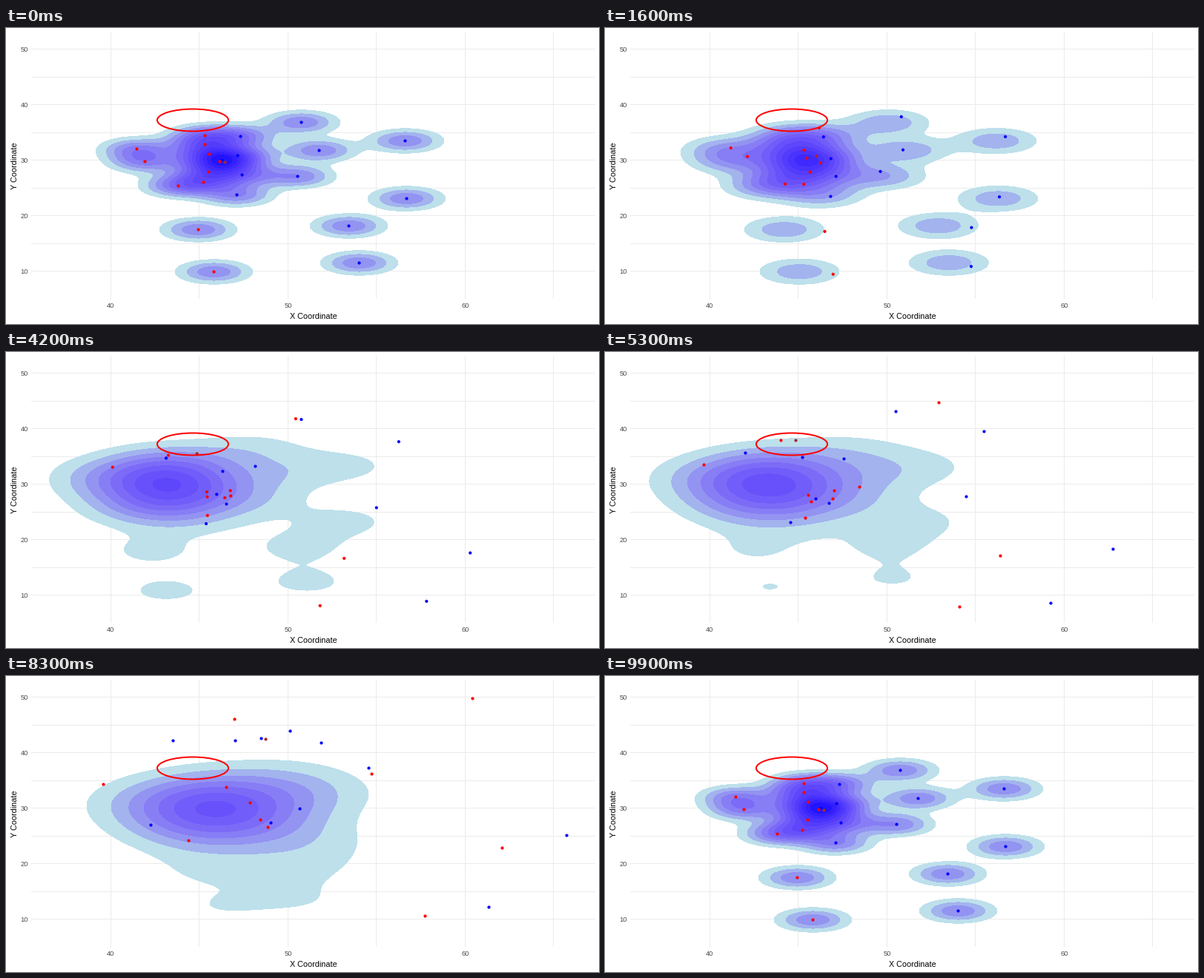
Animation of 800x400 px, one loop 10000 ms. Source, as a matplotlib script:

```python
import matplotlib.pyplot as plt
import numpy as np
from matplotlib.animation import FuncAnimation
from matplotlib.patches import Ellipse

W, H, DPI = 800, 400, 100
FRAMES, INTERVAL = 100, 100
PX = 72 / DPI  # one pixel in points

# Each player: pixel position at the start, at MID and at LATE seconds
MID, LATE = 5.3, 8.3
RED = [
    [(176, 163), (133, 152), (131, 146)],
    [(187, 180), (237, 119), (308, 58)],
    [(268, 145), (450, 68), (629, 30)],
    [(268, 157), (274, 193), (297, 150)],
    [(274, 170), (278, 202), (343, 194)],
    [(288, 180), (309, 187), (329, 171)],
    [(273, 194), (307, 198), (353, 204)],
    [(266, 208), (270, 224), (246, 222)],
    [(232, 213), (343, 182), (493, 132)],
    [(259, 272), (533, 275), (669, 232)],
    [(280, 329), (478, 344), (565, 324)],
]
BLUE = [
    [(316, 146), (189, 136), (225, 87)],
    [(312, 172), (284, 198), (357, 198)],
    [(318, 198), (302, 204), (396, 179)],
    [(311, 225), (250, 230), (195, 201)],
    [(398, 127), (392, 80), (344, 84)],
    [(422, 165), (322, 144), (425, 90)],
    [(393, 200), (266, 142), (309, 87)],
    [(538, 152), (511, 107), (383, 74)],
    [(540, 230), (487, 195), (489, 124)],
    [(462, 267), (685, 266), (756, 215)],
    [(476, 317), (601, 339), (651, 312)],
]
BALL = [[(295, 181), (257, 119), (350, 85)]]
COLORS = ["red"] * len(RED) + ["blue"] * len(BLUE) + ["brown"]

# Frames that repeat the picture before them
HELD = ({*range(1, 50, 4)} | {*range(56, 93, 4)} | {24, 28, 87, 94, 95, 97, 98})

LEVELS = np.arange(1, 15)
GX = np.arange(40, 681, 2.0)
GY = np.arange(90, 371, 1.5)

# Start at rest: p = start + a t^2 + b t^3, with a and b from the two later points
START, at_mid, at_late = np.array(RED + BLUE + BALL, float).transpose(1, 0, 2)
det = MID**2 * LATE**2 * (LATE - MID)
ACCEL = ((at_mid - START) * LATE**3 - (at_late - START) * MID**3) / det
JERK = ((at_late - START) * MID**2 - (at_mid - START) * LATE**2) / det


def positions(t):
    return START + ACCEL * t**2 + JERK * t**3


def density(t):
    """Kernel density whose bumps drift left and back, gather and widen."""
    grow = 1 - np.exp(-(t / 4) ** 2)
    r = START[:, 0] - 294
    drift = -66 * np.sin(np.pi * t / 9.1) ** 2 * np.exp(-(r / 260) ** 2)
    gather = grow**2 * (130 * np.tanh(r / 130) - r)
    x = START[:, 0] + drift + gather
    y = START[:, 1] - .1 * grow**2 * (START[:, 1] - 182)
    scale = 1 + 1.2 * grow
    ex = np.exp(-((GX - x[:, None]) / (32 * scale)) ** 2 / 2)
    ey = np.exp(-((GY - y[:, None]) / (10.2 * scale)) ** 2 / 2)
    return 3.78 / scale**2 * ey.T @ ex


def lab_to_rgb(lab):
    light, a, b = lab
    fy = (light + 16) / 116
    f = np.array([fy + a / 500, fy, fy - b / 200])
    xyz = np.where(f > 6 / 29, f**3, (f - 4 / 29) * 108 / 841) * [.9505, 1, 1.089]
    lin = np.clip([[3.2406, -1.5372, -.4986], [-.9689, 1.8758, .0415],
                   [.0557, -.204, 1.057]] @ xyz, 0, 1)
    return np.where(lin > .0031308, 1.055 * lin ** (1 / 2.4) - .055, 12.92 * lin)


def level_shades():
    """Light blue to blue on a log scale, each level laid over the last."""
    low, high = np.array([83.8, -10.9, -11.5]), np.array([32.3, 79.2, -107.9])
    shade, shades = np.ones(3), []
    for f in np.log(LEVELS) / np.log(LEVELS[-1]):
        shade = .8 * lab_to_rgb(low + f * (high - low)) + .2 * shade
        shades.append(tuple(shade))
    return shades


plt.rcParams["font.family"] = "Liberation Sans"
fig = plt.figure(figsize=(W / DPI, H / DPI), dpi=DPI, facecolor="white")
ax = fig.add_axes([0, 0, 1, 1])
ax.axis("off")

# Grid lines every 5 units, labels every 10
grid = dict(color="#EBEBEB", lw=PX, zorder=0, snap=False)
tick = dict(color="#4D4D4D", size=9.4 * PX, va="center")
for value in range(40, 66, 5):
    x = int(141 + 23.9 * (value - 40))
    ax.plot([x, x], [5, 365], **grid)
    if value % 10 == 0:
        ax.text(x, 375.5, value, ha="center", **tick)
for value in range(10, 51, 5):
    y = int(328.5 - 7.5 * (value - 10))
    ax.plot([34, 794], [y, y], **grid)
    if value % 10 == 0:
        ax.text(29.5, y + 1, value, ha="right", **tick)

title = dict(color="black", size=10.8 * PX, ha="center", va="center")
ax.text(414, 389.5, "X Coordinate", **title)
ax.text(11.5, 185.5, "Y Coordinate", rotation=90, **title)

ax.add_patch(Ellipse((251.5, 124), 96, 30, fill=False, ec="red", lw=2 * PX, zorder=4))
dots = ax.scatter(*START.T, s=(4.2 * PX) ** 2, c=COLORS, linewidths=0, zorder=3)

shades = level_shades()
shown = []
for n in range(FRAMES):
    shown.append(shown[-1] if n in HELD else n)
shown[-1] = 0
layers = []


def update(n):
    t = shown[n] * INTERVAL / 1000
    while layers:
        layers.pop().remove()
    layers.append(ax.contourf(GX, GY, density(t), levels=LEVELS, colors=shades,
                              extend="max", zorder=1))
    ax.set_xlim(-.5, W - .5)
    ax.set_ylim(H - .5, -.5)
    dots.set_offsets(positions(t))
    return layers


anim = FuncAnimation(fig, update, frames=FRAMES, interval=INTERVAL,
                     repeat=True, repeat_delay=0, blit=False)
plt.show()
```
